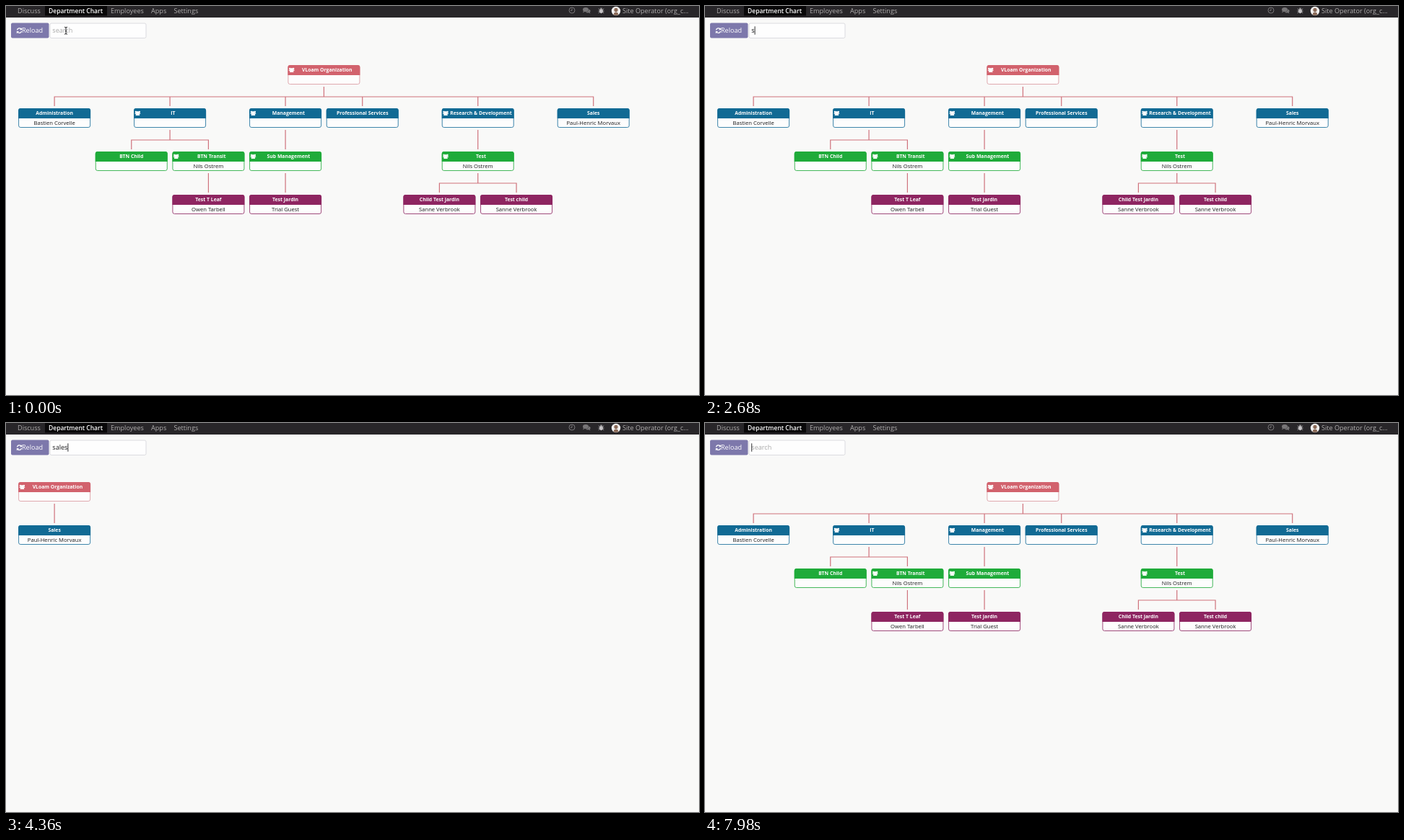
These frames come from a looping animation (960x540 px, 8 s). An HTML page:

```html
<!DOCTYPE html>
<html lang="en">
<head>
<meta charset="utf-8">
<title>Department Chart</title>
<style>
  html, body { margin: 0; width: 100%; height: 100%; overflow: hidden; background: #f9f9f8; }
  svg { display: block; width: 960px; height: 540px; }
  text { font-family: "Open Sans", "Noto Sans", sans-serif; font-size: 9.1px; white-space: pre; }
  .nav text { fill: #b0aeae; }
  .nav .active { fill: #fff; font-size: 8.5px; font-weight: 600; }
  .card .title { font-size: 6.85px; font-weight: 700; fill: #fdfdfd; text-anchor: middle; }
  .card .person { font-size: 7.65px; fill: #1c1c1e; text-anchor: middle; }
  .link { fill: none; stroke: #cf727c; stroke-width: 1.2; }
</style>
</head>
<body>
<svg viewBox="0 0 960 540">
  <defs>
    <g id="people">
      <circle cx="-2.4" cy="-1.7" r="1.3"/><circle cx="2.4" cy="-1.7" r="1.3"/>
      <circle cy="-.9" r="1.8"/>
      <path d="M-4 1.2q0-1.7 1.6-1.7h4.8q1.6 0 1.6 1.7zM-2.8 3.3q0-2.8 2.8-2.8t2.8 2.8z"/>
    </g>
  </defs>

  <g class="nav">
    <rect width="960" height="16" fill="#282629"/>
    <rect x="54" width="86" height="13.5" fill="#080708"/>
    <text x="16" y="9.5">Discuss</text>
    <text x="59" y="9.5" class="active">Department Chart</text>
    <text x="145" y="9.5">Employees</text>
    <text x="201" y="9.5">Apps</text>
    <text x="232.5" y="9.5">Settings</text>
    <g fill="none" stroke="#777577">
      <circle cx="784" cy="6" r="4"/>
      <path d="M784 3.5V6.3h-2"/>
    </g>
    <g fill="#777577">
      <ellipse cx="803" cy="5" rx="4" ry="3"/>
      <path d="M800 7l-1 2.5 3-1.8zM807.6 4.2q3.6 2.3 1 4.5l1 1.9-2.8-1.3q-2.6.4-4-.8 4.5-.3 4.8-4.3z"/>
    </g>
    <g fill="#c4c2c4" stroke="#c4c2c4" stroke-width=".8">
      <ellipse cx="824.5" cy="7" rx="2" ry="2.8"/>
      <path d="M820.8 3.8l7.4 6M828.2 3.8l-7.4 6M820.5 7h8M823 3.2h3"/>
    </g>
    <circle cx="845" cy="7" r="6.2" fill="#f2f1f0"/>
    <circle cx="845" cy="5.4" r="2.6" fill="#8a6a58"/>
    <path d="M841.6 12q.6-3.4 3.4-3.4t3.4 3.4q-3.4 2-6.8 0z" fill="#8a6a58"/>
    <text x="854" y="9.5">Site Operator (org_c...</text>
  </g>

  <rect x="7" y="23.5" width="52.5" height="21" rx="2" fill="#7d78ab"/>
  <g fill="none" stroke="#fff" stroke-width="1.3">
    <path d="M15.4 33.4a3.2 3.2 0 0 1 5.6-1.4M21.6 34.8a3.2 3.2 0 0 1-5.6 1.4"/>
  </g>
  <path d="M22.2 30v3.2h-3.2zM14.8 38.2V35h3.2z" fill="#fff"/>
  <text x="22" y="37.4" fill="#fff">Reload</text>

  <rect x="61" y="24" width="133" height="20.5" rx="2" fill="#fefefe" stroke="#dcdce0"/>
  <text id="hint" x="64.3" y="37.4" fill="#a9a9a9">search</text>
  <text id="query" x="64.3" y="37.4" fill="#1c1c1e"></text>
  <rect id="caret" y="28.3" width=".9" height="11.4" fill="#1c1c1e"/>
  <path id="pointer" d="M81 29.2q2 0 2 1.2 0-1.2 2-1.2M83 30v8.4M81 39.2q2 0 2-1.2 0 1.2 2 1.2M82 34.8h2" fill="none" stroke="#2a2a2c"/>

  <g id="full"></g>
  <g id="filtered"></g>
</svg>

<script>
const LOOP = 8000, CLICK = 860, FILTER = 3400, RESTORE = 7100;
const LEVEL_COLORS = ['#d2626d', '#116a94', '#1fab3a', '#8e2561'];
const BORDER_COLORS = ['#dfa9af', '#3f86ab', '#45b85b', '#a04a7c'];

// Search box contents from each moment on
const typing = [
  [0, ''], [2580, 's'], [3000, 'sa'], [3400, 'sal'], [3800, 'sale'], [4200, 'sales'],
  [5300, 'sale'], [5700, 'sal'], [6000, 'sa'], [6250, 's'], [6500, '']
];

// Each department: title, column, person, children
const dept = (title, column, person = '', children = []) => ({ title, column, person, children });

const sales = column => dept('Sales', column, 'Paul-Henric Morvaux');
const organization = (column, children) => dept('VLoam Organization', column, '', children);

const fullTree = organization(7, [
  dept('Administration', 0, 'Bastien Corvelle'),
  dept('IT', 3, '', [
    dept('BTN Child', 2),
    dept('BTN Transit', 4, 'Nils Ostrem', [dept('Test T Leaf', 4, 'Owen Tarbell')])
  ]),
  dept('Management', 6, '', [
    dept('Sub Management', 6, '', [dept('Test Jardin', 6, 'Trial Guest')])
  ]),
  dept('Professional Services', 8),
  dept('Research & Development', 11, '', [
    dept('Test', 11, 'Nils Ostrem', [
      dept('Child Test Jardin', 10, 'Sanne Verbrook'),
      dept('Test child', 12, 'Sanne Verbrook')
    ])
  ]),
  sales(14)
]);
const filteredTree = organization(0, [sales(0)]);

const $ = id => document.getElementById(id);
const centre = node => 67.1 + node.column * 53.33;
const escape = s => s.replace('&', '&amp;');

function link(x, children, y) {
  const xs = children.map(centre);
  const path = xs.length === 1
    ? `M${x} ${y + 30}v27`
    : `M${x} ${y + 30}v14M${xs[0] - .6} ${y + 44}H${xs.at(-1) + .6}` +
      xs.map(cx => `M${cx} ${y + 44}v13`).join('');
  return `<path class="link" d="${path}"/>`;
}

function draw(node, level = 0) {
  const x = centre(node), y = 82 + level * 60, left = x - 50;
  const hasChildren = node.children.length > 0;
  return `<g class="card">
    <rect x="${left + .5}" y="${y + .5}" width="99" height="26" rx="2.5" fill="#fdfdfd" stroke="${BORDER_COLORS[level]}"/>
    <path d="M${left} ${y + 14}v-11q0-3 3-3h94q3 0 3 3v11z" fill="${LEVEL_COLORS[level]}"/>
    ${hasChildren ? `<use href="#people" x="${left + 5.3}" y="${y + 6.8}" fill="#fdfdfd"/>` : ''}
    <text class="title" x="${x + (hasChildren ? 4.3 : 0)}" y="${y + 9.4}">${escape(node.title)}</text>
    <text class="person" x="${x}" y="${y + 22.6}">${node.person}</text>
  </g>
  ${hasChildren ? link(x, node.children, y) : ''}
  ${node.children.map(child => draw(child, level + 1)).join('')}`;
}

const show = (id, visible) => $(id).setAttribute('visibility', visible ? 'visible' : 'hidden');

function render(t) {
  const text = typing.findLast(([start]) => t >= start)[1];
  const filtered = t >= FILTER && t < RESTORE;
  if ($('query').textContent !== text) $('query').textContent = text;
  $('caret').setAttribute('x', 64.3 + (text ? $('query').getComputedTextLength() : 0));
  show('hint', !text);
  show('caret', t >= CLICK);
  show('pointer', t < typing[1][0]);
  show('full', !filtered);
  show('filtered', filtered);
}

$('full').innerHTML = draw(fullTree);
$('filtered').innerHTML = draw(filteredTree);

const begin = performance.now();
function tick() {
  render((performance.now() - begin) % LOOP);
  requestAnimationFrame(tick);
}
tick();
</script>
</body>
</html>
```
